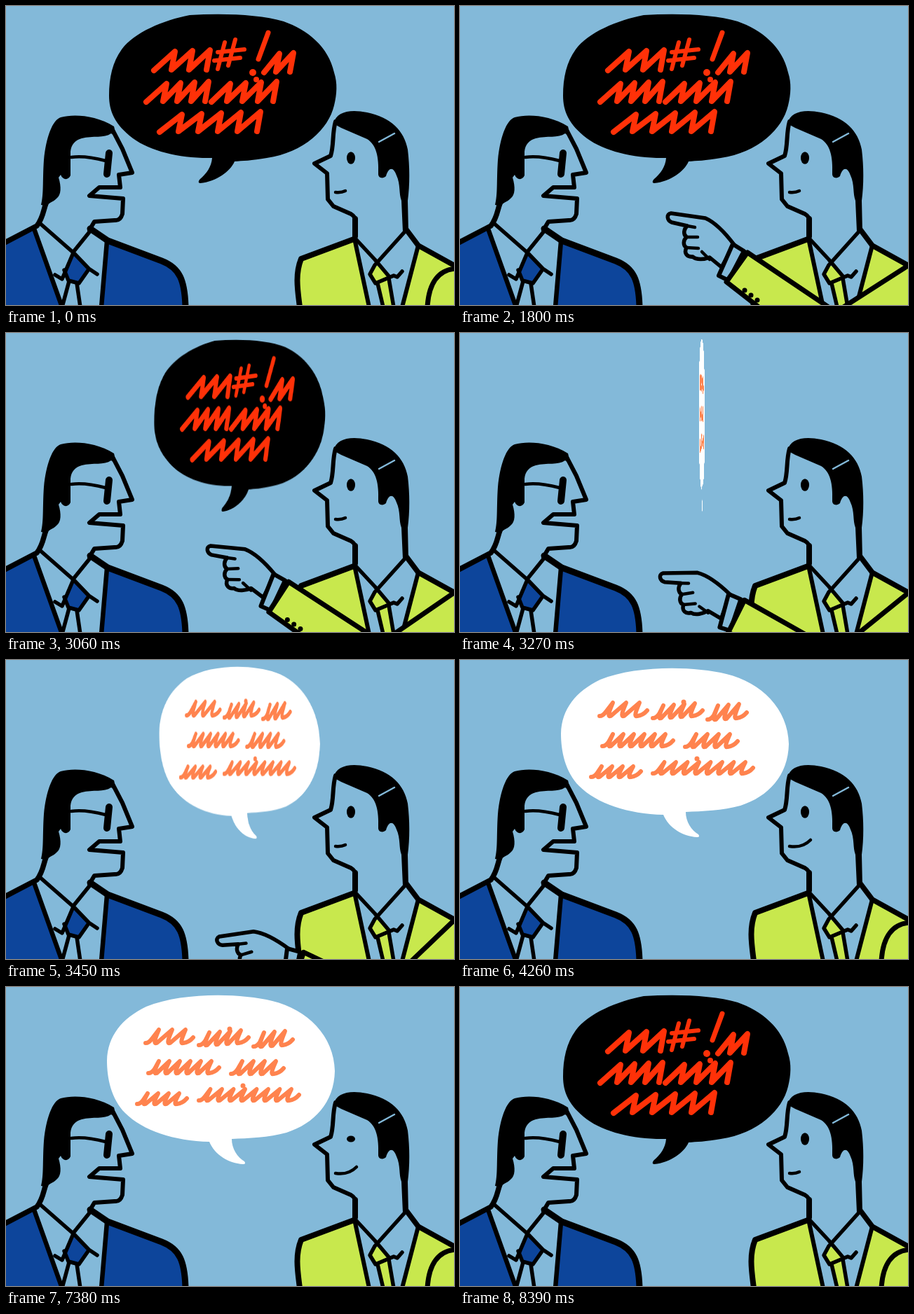
An HTML page with a canvas for the animation above (8.59 s loop, 639x427 px).

```html
<!DOCTYPE html>
<html lang="en">
<head>
<meta charset="utf-8">
<title>Turning the conversation</title>
<style>
html, body { margin: 0; width: 100%; height: 100%; overflow: hidden; background: #83b9d9; }
canvas { display: block; width: 639px; height: 427px; }
</style>
</head>
<body>
<canvas id="stage" width="639" height="427"></canvas>
<script>
const W = 639, H = 427, LOOP = 8590, STEP = 30;
const SKY = '#83b9d9', INK = '#000', BLUE = '#0d459b', LIME = '#c8e84d';
const RED = '#ff3108', ORANGE = '#ff834e', WHITE = '#fff';
const ctx = document.getElementById('stage').getContext('2d');

function fill(c, d, color) {
  c.fillStyle = color;
  c.fill(new Path2D(d));
}
function line(c, d, width, color = INK) {
  c.lineCap = c.lineJoin = 'round';
  c.lineWidth = width;
  c.strokeStyle = color;
  c.stroke(new Path2D(d));
}
function dot(c, x, y, rx, ry = rx, color = INK) {
  c.fillStyle = color;
  c.beginPath();
  c.ellipse(x, y, rx, ry, 0, 0, Math.PI * 2);
  c.fill();
}
function layer(draw) {
  const cv = document.createElement('canvas');
  cv.width = W;
  cv.height = H;
  draw(cv.getContext('2d'));
  return cv;
}
const clamp = v => Math.max(0, Math.min(1, v));
const ease = (t, a, b) => (1 - Math.cos(Math.PI * clamp((t - a) / (b - a)))) / 2;

// Angular scrawl: n slanted strokes, the first one longer
function zigzag(c, x, y, n, dx, h, lean = 30) {
  let d = `M${x} ${y}`;
  for (let i = 0; i < n; i++) {
    const px = x + lean + i * dx;
    d += `L${px} ${y - h - i}L${px - 5} ${y - 1}`;
  }
  line(c, d, 8, RED);
}
// Rounded handwriting: n loops with a closing flick
function script(c, x, y, n, dx, h, rise = 0) {
  let d = `M${x} ${y}q5 0 9 -6`;
  for (let i = 0; i < n; i++) {
    const px = x + dx * (i + 1), py = y - rise * i;
    d += `L${px} ${py - h}C${px - 4} ${py - h * .5} ${px - 9} ${py + 2} ${px - 3} ${py}`;
  }
  d += `q8 -1 14 -8`;
  line(c, d, 6, ORANGE);
}

const angry = layer(c => {
  fill(c, `M147 128C147 102 152 80 165 62C182 38 225 20 262 13C310 10 362 12 396 22C430 34 460 58 468 95
    C473 110 472 126 468 142C460 176 425 209 372 217C350 221 337 221 326 222C320 236 300 251 277 253
    C274 253 274 250 277 247C286 239 293 230 294 217C250 218 207 208 181 189C155 169 147 150 147 128Z`, INK);
  zigzag(c, 211, 92, 3, 25, 27);
  line(c, 'M312 52L302 90M327 48L317 85M302 66L340 62M297 78L334 74', 6, RED);
  line(c, 'M374 38L360 76', 7, RED);
  dot(c, 352, 95, 5, 5, RED);
  zigzag(c, 368, 95, 2, 20, 27, 22);
  zigzag(c, 200, 137, 4, 20, 26, 29);
  zigzag(c, 293, 137, 4, 22, 26, 27);
  dot(c, 357, 105, 4, 4, RED);
  zigzag(c, 219, 180, 5, 28, 25, 32);
});

const calm = layer(c => {
  fill(c, `M144 105C145 70 165 45 200 28C250 8 330 8 380 20C430 32 468 70 469 120
    C468 165 440 195 400 208C375 215 345 216 322 217C322 231 330 243 340 249
    C342 252 341 253 338 253C318 252 298 240 290 221C240 220 195 205 170 180C150 160 144 130 144 105Z`, WHITE);
  script(c, 199, 80, 3, 19, 19);
  script(c, 275, 83, 4, 15, 18, 1);
  script(c, 353, 85, 3, 15, 20, 1);
  dot(c, 319, 60, 3.5, 3.5, ORANGE);
  script(c, 203, 123, 6, 15, 17);
  script(c, 321, 124, 4, 16, 18);
  script(c, 187, 167, 4, 15, 15);
  script(c, 275, 162, 8, 16.5, 16);
  dot(c, 338, 141, 3.5, 3.5, ORANGE);
});

// Card turn: narrows to its edge, drifting right and growing slightly
function bubble(turn) {
  const cx = 308, cy = 132, a = Math.PI * turn, lift = Math.sin(a);
  ctx.save();
  ctx.translate(cx + 37 * lift, cy);
  ctx.scale(Math.abs(Math.cos(a)), 1 + .025 * lift);
  ctx.drawImage(turn < .5 ? angry : calm, -cx, -cy);
  ctx.restore();
}

const scene = layer(c => {
  c.fillStyle = SKY;
  c.fillRect(0, 0, W, H);

  // Man in blue
  fill(c, 'M0 337L40 317L80 427H0Z', BLUE);
  fill(c, 'M144 336L222 366C246 375 255 392 256 427H136Z', BLUE);
  fill(c, 'M97 355L83 377L89 392L104 396L117 377Z', BLUE);
  line(c, 'M-4 339L44 314C55 300 53 287 60 275', 7.5);
  line(c, 'M40 318L80 430M144 336L136 430', 6.5);
  line(c, 'M120 318L145 335L222 364C248 374 255 392 256 430', 9);
  line(c, 'M48 310L97 353L118 375L130 383M122 319L97 350L80 390L70 384', 5.5);
  line(c, 'M83 377L89 392L104 396L118 376M90 393L80 430M101 396L106 430', 5.5);
  fill(c, `M78 159C97 154 128 156 154 172L158 188L150 182C140 189 124 185 108 189C98 192 93 198 92 208
    L92 242C89 249 81 249 78 241L75 245C79 258 79 270 72 275C66 281 61 280 59 286L50 284
    C54 268 52 250 54 220C57 188 66 163 78 159Z`, INK);
  line(c, `M153 179L166 204L180 238L161 241L163 259L133 259L119 271L167 275L166 297
    Q163 307 155 306L126 308L119 320`, 6);
  line(c, 'M93 216Q112 213 142 221', 4.5);
  line(c, 'M147 210L144 240', 10);

  // Man in green
  fill(c, 'M497 332L421 361C412 385 416 406 419 427H518Z', LIME);
  fill(c, 'M588 342L642 371V427H564Z', LIME);
  fill(c, 'M526 370L519 383L527 396L546 387L537 374ZM530 396L546 389L553 427H538Z', LIME);
  line(c, 'M496 333L421 361C412 383 416 406 419 430', 8);
  line(c, 'M497 332L518 430M588 342L565 430', 6);
  line(c, 'M570 318L588 342L644 373', 7.5);
  line(c, 'M500 334L526 362L547 387M570 321L526 370L519 383L527 396L553 385L558 387L565 379', 5.5);
  line(c, 'M530 396L538 430M546 389L553 430', 5.5);
  fill(c, `M467 168C471 151 490 147 515 152C549 159 568 178 573 205C576 230 576 255 573 278
    L574 322L566 322L564 278C560 268 563 255 557 242C553 230 546 229 542 243C538 247 531 246 531 240
    C532 215 528 198 515 190L478 174Z`, INK);
  line(c, 'M532 194L554 182', 2.5, SKY);
  line(c, 'M470 165C465 182 468 199 463 214L440 225L458 239L459 276L467 286L492 297Q499 301 499 309', 6);
  line(c, 'M498 304V329', 8);
});

// Time, cuff x, cuff y, swing in degrees
const POSES = [
  [1500, 345, 490, -25], [1800, 398, 372, 0], [2250, 460, 204, 32],
  [2430, 424, 299, 17], [3270, 397, 403, -9], [4080, 520, 560, -40]
];
function pose(t) {
  const last = POSES.length - 1;
  if (t >= POSES[last][0]) return POSES[last].slice(1);
  let i = 0;
  while (t >= POSES[i + 1][0]) i++;
  const p = POSES[i], q = POSES[i + 1], dt = q[0] - p[0], s = (t - p[0]) / dt;
  const slope = (j, k) => j === 0 || j === last ? 0 :
    (POSES[j + 1][k] - POSES[j - 1][k]) / (POSES[j + 1][0] - POSES[j - 1][0]);
  return [1, 2, 3].map(k =>
    p[k] * (1 + 2 * s) * (1 - s) ** 2 + slope(i, k) * dt * s * (1 - s) ** 2 +
    q[k] * s * s * (3 - 2 * s) + slope(i + 1, k) * dt * s * s * (s - 1));
}

function arm(t) {
  const [wx, wy, deg] = pose(t), a = deg * Math.PI / 180;
  const co = Math.cos(a), si = Math.sin(a), ox = 398, oy = 372;
  const at = (x, y) => [
    wx + (x - ox) * co - (y - oy) * si,
    wy + (x - ox) * si + (y - oy) * co
  ];

  ctx.save();
  ctx.translate(wx, wy);
  ctx.rotate(a);
  ctx.translate(-ox, -oy);
  const hand = `M301 296C294 297 295 306 302 309L324 314C319 319 318 326 323 330
    C318 335 318 342 323 345C319 353 324 359 332 358C337 363 349 362 356 359L373 373L391 341
    C379 325 366 310 350 303Z`;
  fill(ctx, hand, SKY);
  line(ctx, hand, 5.5);
  line(ctx, 'M324 314L335 316M323 330L339 330M323 345L340 346M345 351L356 362', 4.5);
  const cuff = 'M389 340L405 350L383 392L369 385Z';
  fill(ctx, cuff, SKY);
  line(ctx, cuff, 6);
  ctx.restore();

  const upper = at(410, 352), lower = at(380, 394), under = at(512, 497);
  const elbow = [536, 437 - 2 * deg], shoulder = [642, 369];
  const edge = `M${under}L${lower}L${upper}L${elbow}L${shoulder}`;
  fill(ctx, `${edge}L660 560Z`, LIME);
  line(ctx, edge, 7);
  for (let i = 0; i < 3; i++) dot(ctx, ...at(406 + 9 * i, 406 + 7 * i), 3.5);
}

function eyeOpen(t) {
  for (const start of [6260, 7380]) {
    const k = Math.floor((t - start) / STEP);
    if (k >= 0 && k < 3) return [.52, .2, .52][k];
  }
  return 1;
}

function render(t) {
  const back = ease(t, 7990, 8370);
  const turn = ease(t, 2704, 3824) - back;
  const smile = ease(t, 4095, 4250) - back;
  const raised = t >= 1500 && t < 4230;

  ctx.drawImage(scene, 0, 0);
  bubble(turn);
  dot(ctx, 492, 217, 6, 8.8 * eyeOpen(t));
  line(ctx, `M470 266Q${478 + 10 * smile} ${267 + 2 * smile} ${484 + 16 * smile} ${264 - 7 * smile}`, 4.5);
  if (raised) arm(t);
  else line(ctx, 'M601 430C603 395 617 376 643 375', 7);
}

function tick(now) {
  const t = now % LOOP;
  // Blinks and the turn back run on their own beat
  const beat = t < 6260 ? 0 : t < 7380 ? 6260 : t < 8000 ? 7380 : 8000;
  render(beat + Math.floor((t - beat) / STEP) * STEP);
  requestAnimationFrame(() => tick(performance.now() - begin));
}
const begin = performance.now();
tick(0);
</script>
</body>
</html>
```
